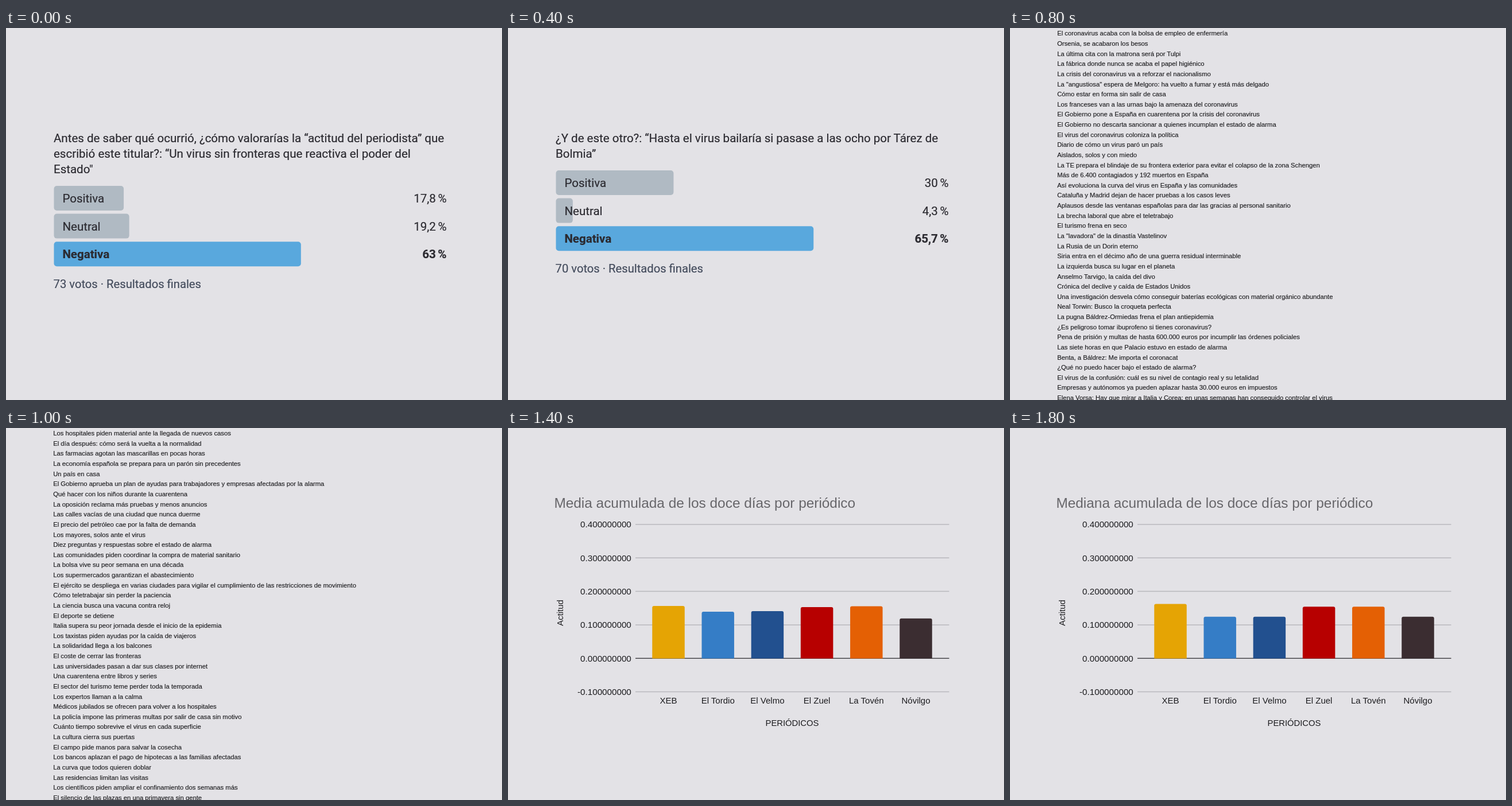
An HTML page for the animation above (2 s loop, 864 by 648 pixels).

```html
<!DOCTYPE html>
<html lang="es">
<head>
<meta charset="utf-8">
<title>Titulares y actitud</title>
<style>
html, body { margin: 0; width: 100%; height: 100%; overflow: hidden; background: #e3e2e6; }
svg { display: block; width: 864px; height: 648px; font-family: "Liberation Sans", Arial, sans-serif; fill: #1c1c1f; }
.scene { visibility: hidden; animation: show 2s step-end infinite; }
@keyframes show {
  0% { visibility: visible; }
  10%, 100% { visibility: hidden; }
}
.poll { font: 20.5px Roboto, sans-serif; fill: #2b2a30; }
.poll text { stroke: #2b2a30; stroke-width: .2px; }
.poll .pct { text-anchor: end; word-spacing: -1.5px; }
.poll .win { font-weight: 700; }
.poll .votes { fill: #434b5c; stroke: #434b5c; font-size: 20.2px; }
.list { font-size: 11.25px; stroke: #1c1c1f; stroke-width: .15px; }
.title { fill: #67666a; }
.end { text-anchor: end; }
.mid { text-anchor: middle; }
</style>
</head>
<body>
<svg id="stage" viewBox="0 0 864 648"></svg>
<script>
const papers = ['XEB', 'El Tordio', 'El Velmo', 'El Zuel', 'La Tovén', 'Nóvilgo'];
const colors = ['#e5a404', '#357dc6', '#22508f', '#b70000', '#e46004', '#3b2d31'];
const days = ['15 Marzo', '22 Marzo', '28 Marzo', '13 Abril', '21 Abril', '22 Abril',
  '27 Abril', '29 Abril', '1 Mayo', '2 Mayo', '6 Mayo', '8 Mayo'];

// Daily attitude per newspaper, in thousandths
const daily = [
  [185, 145, 210, 245, 185, 125, 90, 90, 185, 210, 105, 110],
  [145, 115, 125, 200, 165, 105, 180, 110, 230, 50, 110, 140],
  [145, 305, 185, 95, 100, 115, 35, 160, 100, 160, 145, 155],
  [175, 180, 105, 175, 140, 205, 145, 140, 195, 200, 70, 110],
  [105, 135, 85, 150, 185, 185, 140, 90, 210, 165, 180, 245],
  [245, 150, 255, 30, 110, 210, 175, 115, 80, 40, 30, -5]
];
const means = daily.map(d => d.reduce((a, b) => a + b) / d.length);
const medians = [163, 125, 125, 155, 155, 125];

const early = `El himno de España suena en los balcones para animar la cuarentena
Báldrez deberá guardar cuarentena tras el positivo de Melina Tórez, su mujer
Así frenan los países de Asia al coronavirus
Los autónomos perderán unos 15.000 millones en dos meses
UVEM exige medidas laborales urgentes y suspender el pago de cotizaciones para evitar la quiebra de empresas
La gente tiene miedo a pedir comida a domicilio por si se contagia
¿Paracetamol o ibuprofeno? Qué es mejor contra el coronavirus
Mirel, primer jugador de la Tría que da positivo en coronavirus
Dietmar Holvegart: Hay que reinventar todos los productos que consumimos
El único mercado de España que no puede fallar
Velindo convertirá sus hoteles en hospitales para luchar contra el coronavirus
Día uno: las últimas carcajadas
El Gobierno asume el mando único en todo el territorio y ordena restricciones de movimiento y el cierre de comercios
Las medidas económicas del estado de alarma: transporte a la mitad, intervención de fábricas y eléctricas y cierre de locales de ocio
Sanidad podrá intervenir la industria farmacéutica y disponer de los centros sanitarios privados
Qué se puede hacer y qué no en España tras las restricciones por el coronavirus
Medidas que entran en vigor por el estado de alarma: lista completa
Las peluquerías, desconcertadas ante el anuncio del Gobierno: No somos de primera necesidad
Melina Tórez, mujer de Tulio Báldrez, positivo por coronavirus
Báldrez llama a la unidad, frena la disonancia territorial y pide a las Autonomías que se sitúen detrás del Gobierno
Tremol, ante el estado de alarma: No se puede pedir unidad a la oposición cuando el Gobierno está dividido
Benta y Arzubel se resisten a que Báldrez asuma sus competencias con el estado de alarma: "Es un 155"
Ya sabemos lo que el Estado exige a los ciudadanos, queda por saber qué hará el Estado por ellos
Una epidemia descontrolada lleva a una medicina de catástrofe: sanitarios enfrentados al dilema de a quién salvar
5.753 casos de coronavirus en toda España, 156 fallecidos y 517 altas
España frente a Italia: lo que nos cuenta la curva del coronavirus en cada país
Estos son los países que restringen la entrada a viajeros desde España por el brote de coronavirus
Medicalizar los hoteles: una medida sin precedentes que ya cuenta con la disposición de varias cadenas en Madrid
Médicos, ingenieros y diseñadores se organizan para dar soluciones ante la emergencia sanitaria por el coronavirus
La lucha contra el coronavirus desde la trinchera del hospital: Hay que retrasar el pico para ganar tiempo y reorganizarnos
Aplausos y vítores por la sanidad pública desde los balcones del reino en plena crisis del coronavirus
El sector eléctrico afronta un brusco descenso de la demanda con la mitad del consumo vinculado a la industria
Báldrez impone un confinamiento flexible con el Gobierno dividido
La letra pequeña del decreto de alarma: sacar al perro, sí; pasear al niño, no
La última noche de Madrid
Por un Gobierno de emergencia nacional
Melina Tórez, mujer de Tulio Báldrez, da positivo por coronavirus`;

const middle = `El coronavirus acaba con la bolsa de empleo de enfermería
Orsenia, se acabaron los besos
La última cita con la matrona será por Tulpi
La fábrica donde nunca se acaba el papel higiénico
La crisis del coronavirus va a reforzar el nacionalismo
La "angustiosa" espera de Melgoro: ha vuelto a fumar y está más delgado
Cómo estar en forma sin salir de casa
Los franceses van a las urnas bajo la amenaza del coronavirus
El Gobierno pone a España en cuarentena por la crisis del coronavirus
El Gobierno no descarta sancionar a quienes incumplan el estado de alarma
El virus del coronavirus coloniza la política
Diario de cómo un virus paró un país
Aislados, solos y con miedo
La TE prepara el blindaje de su frontera exterior para evitar el colapso de la zona Schengen
Más de 6.400 contagiados y 192 muertos en España
Así evoluciona la curva del virus en España y las comunidades
Cataluña y Madrid dejan de hacer pruebas a los casos leves
Aplausos desde las ventanas españolas para dar las gracias al personal sanitario
La brecha laboral que abre el teletrabajo
El turismo frena en seco
La "lavadora" de la dinastía Vastelinov
La Rusia de un Dorin eterno
Siria entra en el décimo año de una guerra residual interminable
La izquierda busca su lugar en el planeta
Anselmo Tarvigo, la caída del divo
Crónica del declive y caída de Estados Unidos
Una investigación desvela cómo conseguir baterías ecológicas con material orgánico abundante
Neal Torwin: Busco la croqueta perfecta
La pugna Báldrez-Ormiedas frena el plan antiepidemia
¿Es peligroso tomar ibuprofeno si tienes coronavirus?
Pena de prisión y multas de hasta 600.000 euros por incumplir las órdenes policiales
Las siete horas en que Palacio estuvo en estado de alarma
Benta, a Báldrez: Me importa el coronacat
¿Qué no puedo hacer bajo el estado de alarma?
El virus de la confusión: cuál es su nivel de contagio real y su letalidad
Empresas y autónomos ya pueden aplazar hasta 30.000 euros en impuestos
Elena Vorsa: Hay que mirar a Italia y Corea: en unas semanas han conseguido controlar el virus`;

const late = `Los hospitales piden material ante la llegada de nuevos casos
El día después: cómo será la vuelta a la normalidad
Las farmacias agotan las mascarillas en pocas horas
La economía española se prepara para un parón sin precedentes
Un país en casa
El Gobierno aprueba un plan de ayudas para trabajadores y empresas afectadas por la alarma
Qué hacer con los niños durante la cuarentena
La oposición reclama más pruebas y menos anuncios
Las calles vacías de una ciudad que nunca duerme
El precio del petróleo cae por la falta de demanda
Los mayores, solos ante el virus
Diez preguntas y respuestas sobre el estado de alarma
Las comunidades piden coordinar la compra de material sanitario
La bolsa vive su peor semana en una década
Los supermercados garantizan el abastecimiento
El ejército se despliega en varias ciudades para vigilar el cumplimiento de las restricciones de movimiento
Cómo teletrabajar sin perder la paciencia
La ciencia busca una vacuna contra reloj
El deporte se detiene
Italia supera su peor jornada desde el inicio de la epidemia
Los taxistas piden ayudas por la caída de viajeros
La solidaridad llega a los balcones
El coste de cerrar las fronteras
Las universidades pasan a dar sus clases por internet
Una cuarentena entre libros y series
El sector del turismo teme perder toda la temporada
Los expertos llaman a la calma
Médicos jubilados se ofrecen para volver a los hospitales
La policía impone las primeras multas por salir de casa sin motivo
Cuánto tiempo sobrevive el virus en cada superficie
La cultura cierra sus puertas
El campo pide manos para salvar la cosecha
Los bancos aplazan el pago de hipotecas a las familias afectadas
La curva que todos quieren doblar
Las residencias limitan las visitas
Los científicos piden ampliar el confinamiento dos semanas más
El silencio de las plazas en una primavera sin gente`;

const text = (x, y, s, size, attrs = '') =>
  `<text x="${x}" y="${y}" ${size ? `font-size="${size}"` : ''} ${attrs}>${s}</text>`;
const css = name => `class="${name}"`;

function poll(lines, shares, votes) {
  const top = 194 + 27 * lines.length;
  const rows = ['Positiva', 'Neutral', 'Negativa'].map((label, i) => {
    const y = top + 48.6 * i, win = i === 2, bold = win ? ' win' : '';
    const pct = String(shares[i]).replace('.', ',') + ' %';
    return `<rect x="83.5" y="${y}" width="${shares[i] * 6.83}" height="43" rx="5" fill="${win ? '#59a8dd' : '#b0bac3'}"/>` +
      text(98.4, y + 29.2, label, 0, css(bold)) +
      text(767.5, y + 29.2, pct, 0, css('pct' + bold));
  });
  return `<g class="poll">${lines.map((s, i) => text(83, 199 + 27 * i, s)).join('')}${rows.join('')}` +
    text(82.6, top + 178, `${votes} votos · Resultados finales`, 0, css('votes')) + '</g>';
}

const list = (x, y, rows) => '<g class="list">' +
  rows.split('\n').map((s, i) => text(x, (y + 17.63 * i).toFixed(2), s)).join('') + '</g>';

function grid(x0, x1, top, step, labelX, size, weight) {
  let out = '';
  for (let i = 0; i < 6; i++) {
    const y = top + step * i;
    out += `<path d="M${x0} ${y}H${x1}" stroke="${i === 4 ? '#48474b' : '#b8b7bc'}" stroke-width="${weight}"/>` +
      text(labelX, y + size * .36, ((4 - i) / 10).toFixed(9), size, css('end'));
  }
  return out;
}

// Column centred on cx with rounded outer corners
function bar(cx, base, h, w, radius, color) {
  const r = Math.sign(h) * Math.min(radius, Math.abs(h)), c = Math.abs(r);
  const x = cx - w / 2, y = base - h;
  return `<path fill="${color}" d="M${x} ${base}V${y + r}Q${x} ${y} ${x + c} ${y}H${x + w - c}Q${x + w} ${y} ${x + w} ${y + r}V${base}Z"/>`;
}

const upright = (x, y, size) => text(0, 0, 'Actitud', size, `class="mid" transform="translate(${x} ${y}) rotate(-90)"`);

function grouped() {
  let out = text(80.3, 220.3, 'Media diaria de mal/buen "rollismo" por periódico', 11.1, css('title')) +
    grid(127, 716, 234.4, 30.15, 124.4, 7, 1);
  days.forEach((day, d) => {
    const cx = 159 + 47.64 * d;
    out += text(cx, 395, day, 6.95, css('mid'));
    papers.forEach((_, p) => {
      out += bar(cx - 12.5 + 5.03 * p, 355, daily[p][d] * .3015, 4.7, 1.6, colors[p]);
    });
  });
  papers.forEach((name, p) => {
    const y = 230.7 + 13.3 * p;
    out += `<rect x="727.7" y="${y}" width="7" height="7" rx="1.2" fill="${colors[p]}"/>` + text(738.6, y + 5.9, name, 6.95);
  });
  return out + text(421.5, 412.6, 'DÍAS', 7, css('mid'));
}

function panel(p) {
  let out = text(82, 18.8, 'Media diaria de ' + papers[p], 11.75, css('title')) +
    grid(151, 414, 33, 24.9, 147, 7.35, 1) + upright(89, 107, 7.3);
  days.forEach((day, d) => {
    const cx = 164.4 + 21.37 * d;
    out += bar(cx, 132.6, daily[p][d] * .249, 14.6, 1.6, colors[p]) +
      text(0, 0, day, 7.3, `class="end" transform="translate(${cx + 4.5} 166) rotate(-45)"`);
  });
  out += text(282.5, 202.2, 'DÍAS', 7.3, css('mid'));
  return `<g transform="translate(${p % 2 * 353.6} ${(p >> 1) * 218.7})">${out}</g>`;
}

function summary(kind, values) {
  let out = text(80.4, 139, kind + ' acumulada de los doce días por periódico', 24.4, css('title')) +
    grid(222, 768.5, 168, 58.3, 214.8, 15.2, 1.5) + upright(95.5, 322, 14.8);
  papers.forEach((name, p) => {
    const cx = 279.5 + 86.2 * p;
    out += bar(cx, 401.5, values[p] * .583, 56.5, 3, colors[p]) + text(cx, 479.8, name, 15, css('mid'));
  });
  return out + text(495, 518.8, 'PERIÓDICOS', 14.8, css('mid'));
}

const scenes = [
  poll(['Antes de saber qué ocurrió, ¿cómo valorarías la “actitud del periodista” que',
    'escribió este titular?: “Un virus sin fronteras que reactiva el poder del', 'Estado"'], [17.8, 19.2, 63], 73),
  poll(['¿Y de este otro?: “La primavera que nos robó el virus y otras historias de',
    'balcón”'], [11.1, 30.6, 58.3], 72),
  poll(['¿Y de este otro?: “Hasta el virus bailaría si pasase a las ocho por Tárez de',
    'Bolmia”'], [30, 4.3, 65.7], 70),
  list(83.2, 4.9, early),
  list(82.2, 13.4, middle),
  list(82.2, 13.2, late),
  grouped(),
  summary('Media', means),
  papers.map((_, p) => panel(p)).join(''),
  summary('Mediana', medians)
];

document.getElementById('stage').innerHTML = scenes.map((s, i) =>
  `<g class="scene" style="animation-delay:${i * 200 - 2000}ms">${s}</g>`).join('');
</script>
</body>
</html>
```
